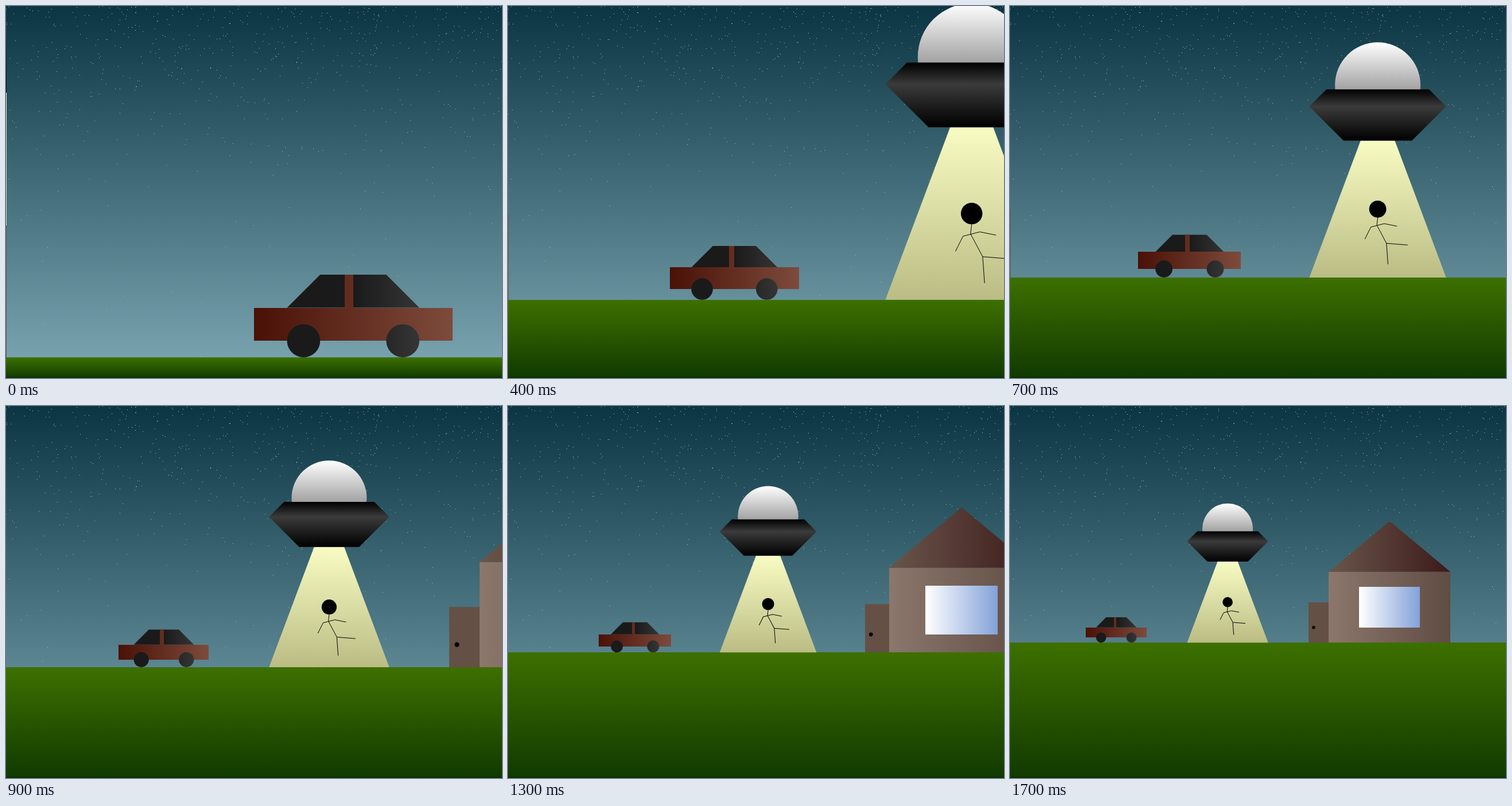
These frames come from a looping animation (864x648 px, 1.8 s). An HTML page with a canvas:

```html
<!DOCTYPE html>
<html lang="en">
<head>
<meta charset="utf-8">
<title>Night visit</title>
<style>
  html, body { margin: 0; width: 100%; height: 100%; overflow: hidden; background: #0c3643; }
  canvas { display: block; width: 864px; height: 648px; }
</style>
</head>
<body>
<canvas id="stage" width="864" height="648"></canvas>
<script>
const W = 864, H = 648, STEP_MS = 100, STEPS = 18;
const ctx = document.getElementById('stage').getContext('2d');

// The world is measured in units: x from the left edge, y down from mid-height.
const GROUND = 5;
let unit = 1;

function gradient(x0, y0, x1, y1, ...colors) {
  const g = ctx.createLinearGradient(x0, y0, x1, y1);
  colors.forEach(([at, color]) => g.addColorStop(at, color));
  return g;
}
const across = (x0, x1, a, b) => gradient(x0, 0, x1, 0, [0, a], [1, b]);
const down = (y0, y1, a, b) => gradient(0, y0, 0, y1, [0, a], [1, b]);

// Rectangle in units with its edges snapped to whole pixels.
function rect(x0, y0, x1, y1, fill) {
  const snap = v => Math.round(v * unit) / unit;
  ctx.fillStyle = fill;
  ctx.fillRect(snap(x0), snap(y0), snap(x1) - snap(x0), snap(y1) - snap(y0));
}

function polygon(points, fill) {
  ctx.beginPath();
  points.forEach(([x, y]) => ctx.lineTo(x, y));
  ctx.fillStyle = fill;
  ctx.fill();
}

function circle(x, y, r, fill) {
  ctx.beginPath();
  ctx.arc(x, y, r, 0, Math.PI * 2);
  ctx.fillStyle = fill;
  ctx.fill();
}

function line(points) {
  ctx.beginPath();
  points.forEach(([x, y]) => ctx.lineTo(x, y));
  ctx.stroke();
}

function makeStars(count) {
  let seed = 20117;
  const random = () => (seed = seed * 48271 % 2147483647) / 2147483647;
  return Array.from({ length: count }, () => ({
    x: Math.floor(random() * W),
    y: Math.floor(-120 * Math.log(random()))
  }));
}
const stars = makeStars(620);

function drawSky() {
  ctx.fillStyle = down(0, H, '#0b3542', '#7ea8b4');
  ctx.fillRect(0, 0, W, H);
  ctx.fillStyle = '#a6c6ac';
  stars.forEach(s => ctx.fillRect(s.x, s.y, 1, 1));
}

function drawGrass() {
  const top = Math.round(H / 2 + GROUND * unit);
  ctx.fillStyle = down(top, H, '#3d7000', '#103a00');
  ctx.fillRect(0, top, W, H - top);
  ctx.fillStyle = '#0a2e04';
  ctx.fillRect(0, H - 2, W, 2);
}

function drawCar() {
  const paint = across(7.5, 13.5, '#4a1106', '#7d4b3c');
  const dark = gradient(7.5, 0, 13.5, 0, [0, '#1a1a1a'], [0.5, '#1a1a1a'], [1, '#424242']);
  polygon([[8.5, 3.5], [9.5, 2.5], [11.5, 2.5], [12.5, 3.5]], dark);
  rect(10.25, 2.5, 10.5, 3.5, paint);
  rect(7.5, 3.5, 13.5, 4.5, paint);
  circle(9, 4.5, 0.5, dark);
  circle(12, 4.5, 0.5, dark);
}

function drawHouse() {
  rect(29.5, 1, 31.5, GROUND, '#655046');
  circle(30, 3.5, 0.16, '#000');
  rect(31.5, -2, 43.5, GROUND, across(31.5, 43.5, '#8b776c', '#5f4c43'));
  polygon([[31.5, -2], [37.5, -7], [43.5, -2]], across(31.5, 43.5, '#6a554a', '#3c1b1b'));
  rect(34.5, -0.5, 40.5, 3.5, across(34.5, 40.5, '#ffffff', '#83a1d8'));
}

function drawPerson(x) {
  const limb = points => line(points.map(([dx, y]) => [x + dx, y]));
  ctx.strokeStyle = '#000';
  ctx.lineWidth = 1 / unit;
  circle(x, 1, 0.5, '#000');
  limb([[0, 1.5], [-0.05, 1.94], [0.51, 3], [0.6, 4.23]]);
  limb([[0.51, 3], [1.75, 3.1]]);
  limb([[-0.75, 2.75], [-0.4, 2.05], [0.38, 1.85], [1.13, 2]]);
}

function drawSaucer() {
  const mid = 21.5;
  polygon([[20.5, -3], [22.5, -3], [25.5, GROUND], [17.5, GROUND]],
    down(-3, GROUND, '#f8fcc3', '#babc84'));
  drawPerson(mid);
  circle(mid, -6.25, 2.5, down(-8.75, -6, '#ffffff', '#a2a2a2'));
  polygon([[18.5, -6], [24.5, -6], [25.5, -5], [23.5, -3], [19.5, -3], [17.5, -5]],
    gradient(0, -6, 0, -3, [0, '#000'], [1 / 3, '#3b3b3b'], [1, '#000']));
}

// Rows of shapes still beyond the right side show as a hairline on the left side.
function drawLeftEdge(span) {
  const strip = (y0, y1, fill) => { if (y1 > y0) rect(0, y0, 1 / unit, y1, fill); };
  strip(Math.max(-5, span - 22.5), -3, down(-5, -3, '#3b3b3b', '#000'));
  if (span < 20.5) {
    const beamEnd = Math.min(GROUND, -3 + (20.5 - span) * 8 / 3);
    strip(-3, beamEnd, down(-3, GROUND, '#f8fcc3', '#babc84'));
  }
  if (span < 29.5) strip(1, GROUND, '#655046');
}

function draw(time) {
  const step = Math.floor(time / STEP_MS) % STEPS;
  const span = 15 + 2 * step;
  unit = W / span;
  ctx.setTransform(1, 0, 0, 1, 0, 0);
  drawSky();
  drawGrass();
  ctx.setTransform(unit, 0, 0, unit, 0, H / 2);
  drawCar();
  drawHouse();
  drawSaucer();
  drawLeftEdge(span);
}

const start = performance.now();
function tick() {
  draw(performance.now() - start);
  requestAnimationFrame(tick);
}
tick();
</script>
</body>
</html>
```
